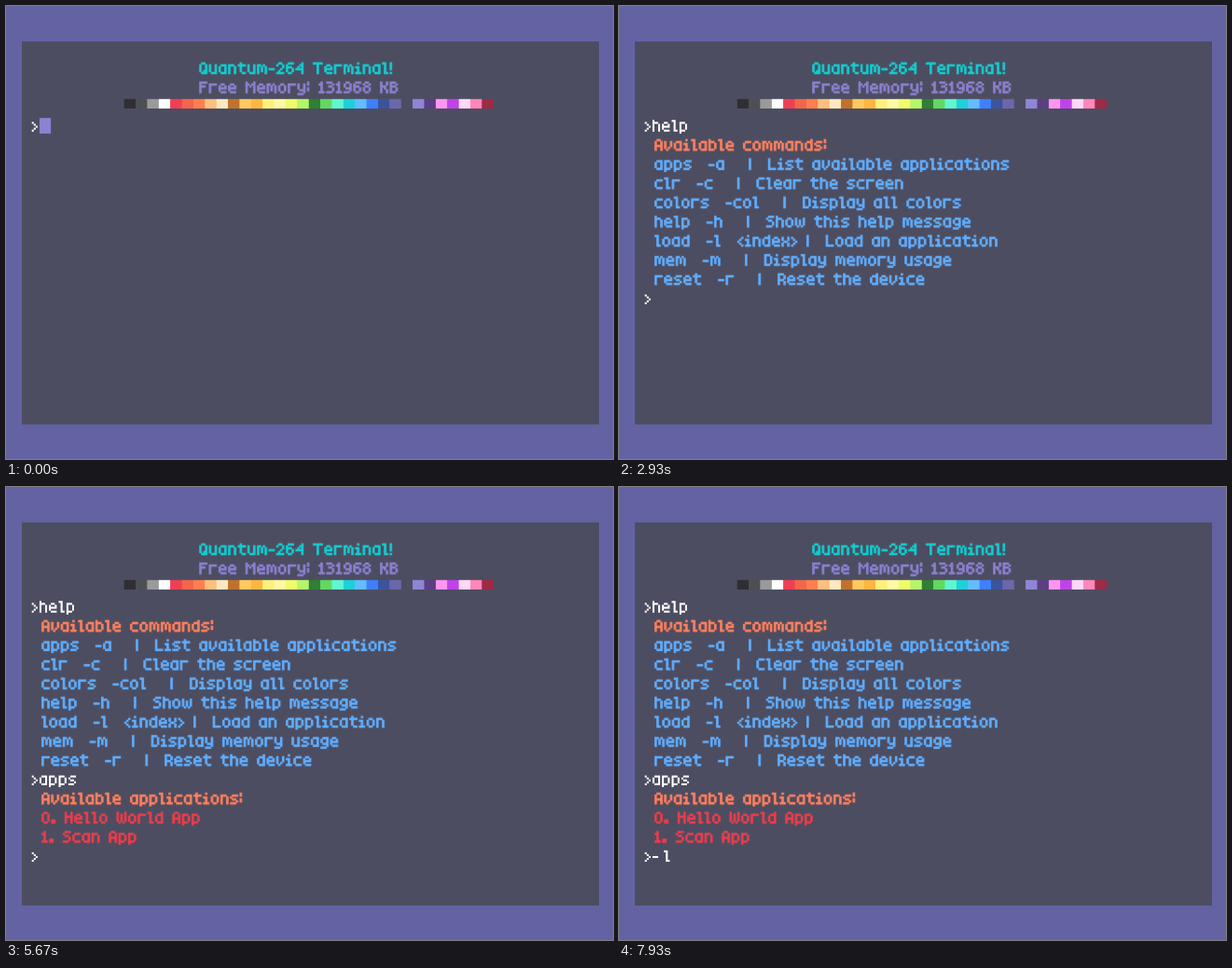
Recreate the animation shown at these times as an HTML page with a canvas. Size 651 by 486 pixels, loop 8 s.

```html
<!DOCTYPE html>
<html lang="en">
<head>
<meta charset="utf-8">
<title>Terminal</title>
<style>
  html, body { margin: 0; width: 100%; height: 100%; overflow: hidden; background: #6362a3; }
  canvas { display: block; }
</style>
</head>
<body>
<canvas id="stage" width="651" height="486" role="img"></canvas>
<script>
const LOOP = 8000;
const PANEL = { x: 17.3, y: 38, cols: 300, rows: 200, scaleX: 2.063, scaleY: 2.057 };
const ZOOM = 4;
const LINE = 10;
const CELL = 6;
const BOLD = 1.25;

const COLOR = {
  border: '#6362a3', panel: '#4d4d61', title: '#10cdd0', memory: '#8a80cf',
  cursor: '#8b82d2', white: '#ffffff', orange: '#ff7f5c', blue: '#5fadff', red: '#ec3c4a'
};

const PALETTE = `#2f2e33 #4c5053 #9a9a9a #ffffff #ef3f54 #f2664a #ff7f50 #ffbf7d
  #ffe8c0 #c0722d #ffc95f #ffb640 #fff07e #fff9a5 #f0fb6a #b4f56a
  #2f7f35 #62d860 #62f5d0 #1ed0d8 #62bcff #3f7ffc #3c549c #6a67ab
  #4d4d61 #8f85d5 #5c3f83 #ff96ef #bf43e8 #ffd8f8 #ff87ba #a02a44`.split(/\s+/);

// Pen strokes per letter; each point is a column and a row, baseline on row 6.
const PEN = {
  a: '32-12-03-05-16-26-35 32-36', b: '01-06-26-35-33-22-02', c: '32-12-03-05-16-36',
  d: '31-36-16-05-03-12-32', e: '04-34-33-22-12-03-05-16-36', g: '32-12-03-04-15-35 32-36-27-07',
  h: '01-06 02-22-33-36', i: '11 03-13-16 06-26', l: '01-11-16-26',
  m: '06-02-12-23-25 23-32-43-46', n: '06-02-22-33-36', o: '12-22-33-35-26-16-05-03-12',
  p: '07-02-22-33-35-26-06', r: '06-02 03-12-32', s: '32-12-03-14-24-35-26-06',
  t: '11-15-26-36 02-32', u: '02-05-16-36 32-36', v: '02-05-16-34-32',
  w: '02-05-16-25-23 25-36-45-42', x: '02-03-14-24-33-32 06-05-14 24-35-36',
  y: '02-04-15-35 32-36-27-07',
  A: '06-02-11-21-32-36 04-34', B: '01-06-26-35-34-23-03 01-21-32-23', C: '31-11-02-05-16-36',
  D: '01-06-26-35-32-21-01', F: '06-01-31 03-23', H: '01-06 31-36 03-33',
  K: '01-06 31-32-23-03 24-35-36', L: '01-06-36', M: '06-01-23-41-46',
  Q: '11-21-32-35-26-16-05-02-11 25-36', R: '06-01-21-32-33-24-04 24-35-36',
  S: '31-11-02-13-23-34-35-26-06', T: '01-41 21-26', W: '01-05-16-25-22 25-36-45-41',
  0: '11-21-32-35-26-16-05-02-11', 1: '02-11-16 06-26', 2: '02-11-21-32-33-06-36',
  3: '01-21-32-23-34-35-26-06 13-23', 4: '36-31-04-34', 6: '31-11-02-05-16-26-35-34-23-03',
  8: '11-21-32-23-13-02-11 13-04-05-16-26-35-34-23', 9: '34-14-03-02-11-21-32-35-26-06',
  '-': '04-24', '|': '01-06', '<': '22-04-26', '>': '02-24-06',
  '.': '05-15-16-06', ':': '01-02 04-05', '!': '01-04 06', ' ': ''
};

const HELP = [
  'Available commands:',
  'apps  -a   |  List available applications',
  'clr  -c   |  Clear the screen',
  'colors  -col   |  Display all colors',
  'help  -h   |  Show this help message',
  'load  -l  <index> |  Load an application',
  'mem  -m   |  Display memory usage',
  'reset  -r   |  Reset the device'
];
const APPS = ['Available applications:', '0. Hello World App', '1. Scan App'];

// Start time, commands already run, text being typed, cursor shown.
const STEPS = [
  [0, 0, '', true], [600, 0, '', false], [1070, 0, '', true], [1470, 0, '', false],
  [1530, 0, 'h', true], [1600, 0, 'h', false], [1800, 0, 'he', false],
  [2000, 0, 'hel', false], [2130, 0, 'hel', true], [2200, 0, 'help', false],
  [2270, 0, 'help', true], [2600, 0, 'help', false], [2930, 1, '', false],
  [3130, 1, '', true], [3670, 1, '', false], [4200, 1, '', true],
  [4330, 1, 'a', false], [4470, 1, 'a', true], [4670, 1, 'ap', false],
  [4870, 1, 'app', false], [5270, 1, 'apps', false], [5330, 1, 'apps', true],
  [5670, 2, '', false], [5740, 2, '', true], [5870, 2, '', false],
  [6330, 2, '', true], [6870, 2, '', false], [7400, 2, '', true],
  [7600, 2, '', false], [7670, 2, '-', false], [7730, 2, '-', true],
  [7930, 2, '-l', false]
];

const stage = document.getElementById('stage');
const ctx = stage.getContext('2d');
const screen = document.createElement('canvas');
screen.width = PANEL.cols * ZOOM;
screen.height = PANEL.rows * ZOOM;
const pen = screen.getContext('2d');
pen.scale(ZOOM, ZOOM);

function box(x, y, w, h, color) {
  pen.fillStyle = color;
  pen.fillRect(x, y, w, h);
}

function traceLine(dots, [x0, y0], [x1, y1]) {
  const n = Math.max(Math.abs(x1 - x0), Math.abs(y1 - y0), 1);
  for (let i = 0; i <= n; i++) {
    dots.add(Math.round(x0 + (x1 - x0) * i / n) + ',' + Math.round(y0 + (y1 - y0) * i / n));
  }
}

function makeGlyph(strokes) {
  const dots = new Set();
  for (const stroke of strokes.split(' ').filter(Boolean)) {
    const points = stroke.split('-').map(p => [+p[0], +p[1]]);
    points.forEach((p, i) => traceLine(dots, points[Math.max(i - 1, 0)], p));
  }
  const cells = [...dots].map(d => d.split(',').map(Number));
  const width = cells.length ? Math.max(...cells.map(c => c[0])) + 1 : 3;
  return { cells, width };
}

const FONT = {};
for (const ch in PEN) FONT[ch] = makeGlyph(PEN[ch]);

// A pitch gives fixed spacing; without one, letters are set by their own width.
function print(text, x, y, color, { pitch = 0, weight = 1 } = {}) {
  const inset = (1 - weight) / 2;
  for (const ch of text) {
    const glyph = FONT[ch];
    for (const [cx, cy] of glyph.cells) {
      box(x + cx + inset, y + cy + inset, weight, weight, color);
    }
    x += pitch || glyph.width + 1;
  }
}

// Coloured output is set a little heavier than what is typed.
function printOutput(text, x, y, color) {
  print(text, x + 0.2, y, color, { weight: BOLD });
}

function printBlock(lines, y, bodyColor) {
  lines.forEach((line, i) => printOutput(line, 10, y + i * LINE, i ? bodyColor : COLOR.orange));
}

function paintScreen([, done, typed, cursor]) {
  box(0, 0, PANEL.cols, PANEL.rows, COLOR.panel);
  printOutput('Quantum-264 Terminal!', 92, 10, COLOR.title);
  printOutput('Free Memory: 131968 KB', 92, 20, COLOR.memory);
  PALETTE.forEach((color, i) => box(53 + i * CELL, 30, CELL, 5, color));

  let y = 40;
  if (done > 0) {
    print('>help', 5, y, COLOR.white);
    printBlock(HELP, y + LINE, COLOR.blue);
    y += (HELP.length + 1) * LINE;
  }
  if (done > 1) {
    print('>apps', 5, y, COLOR.white);
    printBlock(APPS, y + LINE, COLOR.red);
    y += (APPS.length + 1) * LINE;
  }
  print('>', 5, y, COLOR.white);
  print(typed, 9, y, COLOR.white, { pitch: CELL });
  if (cursor) box(9 + typed.length * CELL, y, CELL, 8, COLOR.cursor);
}

function paintStage(step) {
  paintScreen(step);
  ctx.fillStyle = COLOR.border;
  ctx.fillRect(0, 0, stage.width, stage.height);
  ctx.imageSmoothingQuality = 'high';
  ctx.drawImage(screen, PANEL.x, PANEL.y, PANEL.cols * PANEL.scaleX, PANEL.rows * PANEL.scaleY);
  stage.setAttribute('aria-label', 'Quantum-264 Terminal! >' + step[2]);
}

let shown = null;
const start = performance.now();

function tick() {
  const t = (performance.now() - start) % LOOP;
  const step = STEPS.filter(s => s[0] <= t).pop();
  if (step !== shown) paintStage(shown = step);
  requestAnimationFrame(tick);
}
tick();
</script>
</body>
</html>
```
